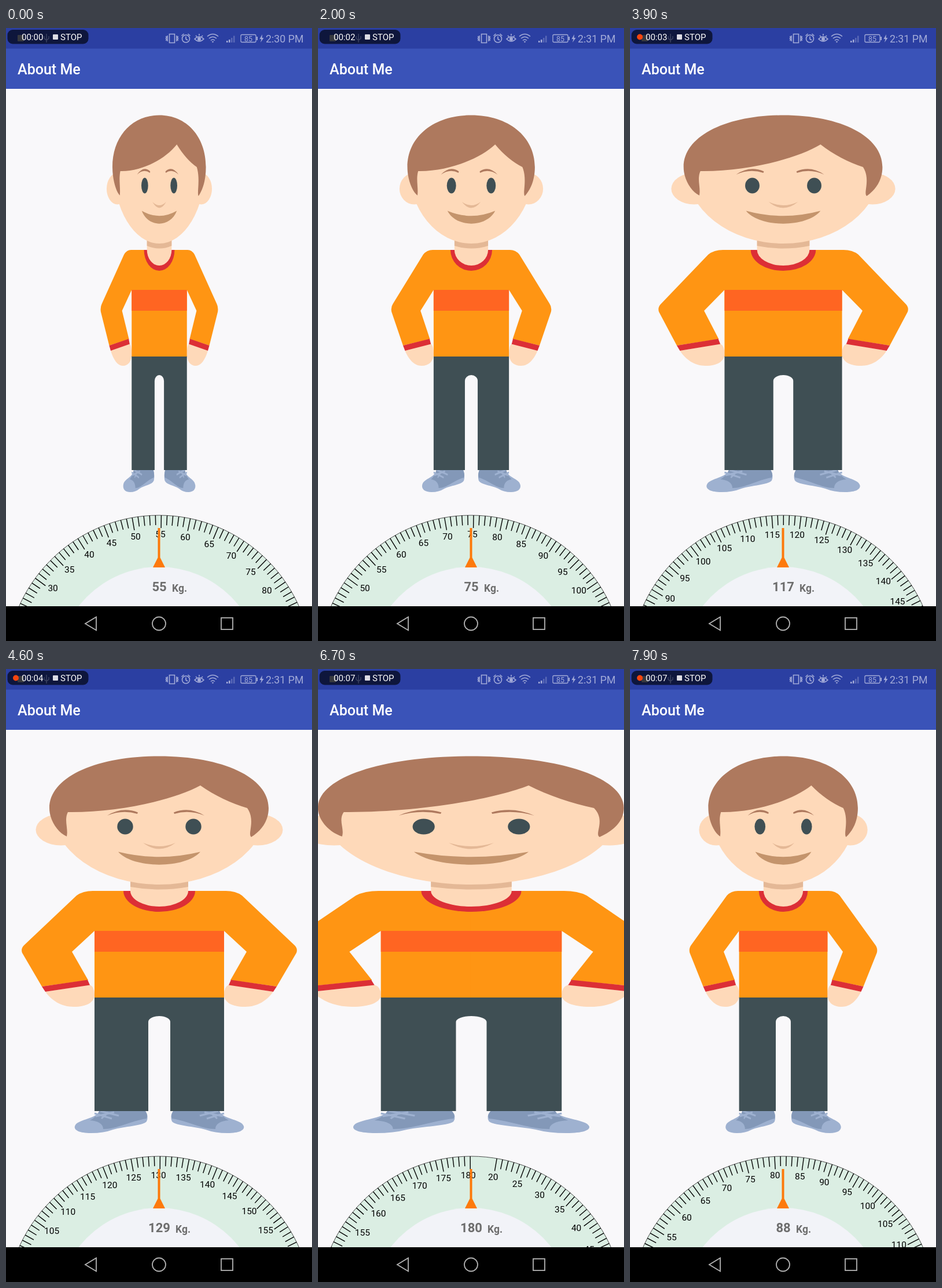
An HTML page that plays this animation: 529 px wide and 1058 px high, repeating every 8000 ms.

```html
<!DOCTYPE html>
<html lang="en">
<head>
<meta charset="utf-8">
<title>About Me</title>
<style>
  html, body { margin: 0; width: 100%; height: 100%; overflow: hidden; background: #f9f8fa; }
  svg { display: block; width: 100vw; height: 100vh; font-family: Roboto, sans-serif; }
  .skin { fill: #fed9b9; }
  .shade { fill: #e4b896; }
  .hair { fill: #ae795e; }
  .slate { fill: #3f4f54; }
  .red { fill: #dc2f36; }
  .orange { fill: #ff9513; }
  .icons { fill: none; stroke: #a3abd8; stroke-width: 1.6; }
  .solid { fill: #a3abd8; stroke: none; }
  .value { font-weight: 700; fill: #6d6d6d; }
  .labels { font-size: 15.5px; text-anchor: middle; fill: #000; }
</style>
</head>
<body>
<svg viewBox="0 0 529 1058" preserveAspectRatio="none">
  <defs>
    <g id="arm">
      <path class="skin" d="M-197 557C-186 572-170 583-148 583C-125 583-112 575-112 562Q-112 549-120 545Z"/>
      <path class="orange" d="M1 383H-115Q-132 383-143 391L-233 476Q-240 482-237 490L-203 548L-123 537L-151 488L-112 452V567H1Z"/>
      <path class="red" d="M-203 548L-124 536.500L-120 545.500L-197 557Z"/>
    </g>
    <g id="shoe">
      <path fill="#9eb1d0" d="M-102 763H-24Q-18 772-22 781C-30 789-60 789-80 795Q-96 801-118 801C-138 801-148 796-146 789C-142 777-115 779-102 763Z"/>
      <path fill="#8398b8" d="M-104 763H-24Q-19 770-22 776C-50 780-72 794-97 794C-97 785-106 780-120 779Q-108 773-104 763Z"/>
      <path fill="none" stroke="#9eb1d0" stroke-width="3" d="M-112 767L-82 776M-110 772L-78 765M-102 763L-70 771M-100 776L-88 765"/>
    </g>
    <path id="brow" class="hair" d="M-90 253Q-64 237-37 247.500L-38 250Q-64 242-90 253Z"/>
  </defs>

  <rect width="529" height="1058" fill="#f9f8fa"/>

  <g id="boy">
    <use href="#shoe"/><use href="#shoe" transform="scale(-1 1)"/>
    <path class="slate" d="M-112 566H112V763H19V609A19 10 0 0 0-19 609V763H-112Z"/>
    <use href="#arm"/><use href="#arm" transform="scale(-1 1)"/>
    <path fill="#ff6522" d="M-112 452H112V488H-112Z"/>
    <path class="red" d="M-62 383A62 36 0 0 0 62 383Z"/>
    <path class="skin" d="M-50 355H50V383A50 27 0 0 1-50 383Z"/>
    <path class="shade" d="M-50 360H50V376Q0 385-50 376Z"/>
    <ellipse class="skin" cx="-170" cy="277.500" rx="43.500" ry="27"/>
    <ellipse class="skin" cx="170" cy="277.500" rx="43.500" ry="27"/>
    <path class="skin" d="M-186 240L-150 190H150L186 240A186 132 0 0 1-186 240Z"/>
    <path class="hair" d="M-190 240C-190 187-110 150.500 0 150.500C110 150.500 189 187 189 240C189 261 178 278 159 290C152 285 167 261 152 240C125 232 95 218 71 201C25 226-70 248-158 247C-165 261-157 275-160 289C-176 282-190 261-190 240Z"/>
    <use href="#brow"/><use href="#brow" transform="translate(-12) scale(-1 1)"/>
    <ellipse class="slate" cx="-59" cy="272" rx="13.700" ry="13.500"/>
    <ellipse class="slate" cx="59" cy="272" rx="13.700" ry="13.500"/>
    <path class="shade" d="M-28 300Q0 312 28 300Q0 321-28 300Z"/>
    <path fill="#c4946c" d="M-71 315.500Q0 333 71 315.500C45 345-45 345-71 315.500Z"/>
  </g>

  <circle cx="264.500" cy="1106" r="265" fill="#dbeee3" stroke="#222" stroke-width=".8"/>
  <circle cx="264.500" cy="1106" r="176" fill="#f2f3f8"/>
  <path id="ticks" fill="none" stroke="#000" stroke-width="1.400"/>
  <g id="labels" class="labels"></g>
  <circle id="touch" r="14" fill="#fff" fill-opacity=".35" stroke="#b9c6c6" stroke-opacity=".7" stroke-width="1.500"/>
  <path fill="#fd7a0c" d="M262.500 863H266.500V914L275 931H254L262.500 914Z"/>
  <text id="number" class="value" x="265" y="972" font-size="22" text-anchor="middle"></text>
  <text id="unit" class="value" y="973" font-size="17.500">Kg.</text>

  <rect width="529" height="36" fill="#2b3fa2"/>
  <rect y="35.500" width="529" height="69.500" fill="#3a53b8"/>
  <text x="20" y="80" font-size="25" font-weight="500" fill="#fff">About Me</text>

  <rect x="2.500" y="3" width="140" height="24.500" rx="9" fill="#0e163c"/>
  <rect x="20" y="12" width="11" height="11" rx="1" fill="#37393f"/>
  <path d="M70 10V25M66 14V18L70 21L74 18V14" fill="none" stroke="#3a4160" stroke-width="1.500"/>
  <circle id="rec" cx="17" cy="15.500" r="5" fill="#f4450f"/>
  <g font-size="15" fill="#fff">
    <text id="timer" x="27" y="21"></text>
    <text x="94" y="21">STOP</text>
  </g>
  <rect x="81" y="11" width="9" height="9" rx="1" fill="#dcdce4"/>

  <g class="icons">
    <path d="M282.500 10.500H291.500V25.500H282.500ZM279 13V23M295 13V23M276.500 14L277.500 16L276.500 18L277.500 20L276.500 22M297.500 14L296.500 16L297.500 18L296.500 20L297.500 22"/>
    <circle cx="311" cy="18.500" r="6.500"/>
    <path d="M311 14.500V19L314 21M303.500 13.500L307.500 10M318.500 13.500L314.500 10"/>
    <path d="M326 19Q334 11 342 19Q334 27 326 19ZM328 13L330 15M334 10V13M340 13L338 15"/>
    <circle class="solid" cx="334" cy="19" r="3"/>
    <path d="M348 14.500Q357.500 6.500 367 14.500M351 18Q357.500 12.500 364 18M354 21.500Q357.500 18.500 361 21.500"/>
    <path class="solid" d="M355.500 23L357.500 25.500L359.500 23ZM381 22H383.500V25H381ZM385 20H387.500V25H385Z"/>
    <path class="solid" opacity=".4" d="M389 17H391.500V25H389ZM393 13.500H395.500V25H393Z"/>
    <rect x="406" y="11.500" width="26" height="13" rx="2" stroke-width="1.300"/>
    <path class="solid" d="M433 15H435V21H433ZM443 11L438.500 19H441.500L440 25L445.500 17H442.500Z"/>
  </g>
  <g class="solid">
    <text x="419" y="22.500" font-size="12.500" text-anchor="middle">85</text>
    <text id="clock" x="449" y="24.500" font-size="17.800"></text>
  </g>

  <rect y="998" width="529" height="60" fill="#000"/>
  <g fill="none" stroke="#b4b4b4" stroke-width="1.800">
    <path d="M137 1028L156 1016.500V1039.500Z"/>
    <circle cx="264.500" cy="1028" r="11.500"/>
    <rect x="372" y="1018" width="20" height="20"/>
  </g>
</svg>
<script>
const LOOP = 8000, STEP = 100;
const CX = 264.5, CY = 1106, RIM = 265, LABEL_R = 227;
const MIN = 20, MAX = 180;
// labels share the full circle evenly; ticks cover 350 degrees of it
const LABEL_UNIT = 2 * Math.PI / (MAX - MIN + 5);
const TICK_UNIT = 350 / 180 * Math.PI / (MAX - MIN);

// time, dial position, weight
const drags = [
  [0, 54.7, 55], [100, 54.7, 55], [300, 57, 57], [800, 57, 57],
  [1700, 71, 71], [2000, 74.7, 75], [2300, 74.7, 75],
  [3000, 97.4, 96], [3200, 101, 101], [3400, 101, 101],
  [4300, 130.1, 129], [4800, 130.1, 129], [5400, 169.9, 167],
  [5600, 174.5, 174], [5700, 174.5, 174], [6600, 180.55, 180],
  [6700, 180.55, 180], [7500, 115, 120], [7900, 81.6, 88], [8000, 81.6, 88]
];
// each entry starts a recorder second; its light comes on at the second time
const seconds = [
  [0, 300], [900, 1400], [1800, 2400], [3100, 3500],
  [4200, 4600], [4900, 5500], [6000, 6300], [6700, 7600]
];

const $ = id => document.getElementById(id);
const angle = v => (v - MIN) * LABEL_UNIT;
const polar = (a, r) => [CX + r * Math.sin(a), CY - r * Math.cos(a)];

let tickPath = '';
const labels = [];
for (let v = MIN; v <= MAX; v++) {
  const major = v % 5 === 0;
  const a = (v - MIN) * TICK_UNIT;
  tickPath += `M${polar(a, RIM)}L${polar(a, RIM - (major ? 22 : 17))}`;
  if (major) {
    const node = document.createElementNS('http://www.w3.org/2000/svg', 'text');
    node.textContent = v;
    $('labels').append(node);
    labels.push({ v, node });
  }
}
$('ticks').setAttribute('d', tickPath);

function dragAt(t) {
  const i = drags.findIndex(k => k[0] > t);
  const [a, b] = [drags[i - 1], drags[i]];
  const p = (t - a[0]) / (b[0] - a[0]);
  return [1, 2].map(n => a[n] + (b[n] - a[n]) * p);
}

function place(node, a, r, x = 'x', y = 'y') {
  const [px, py] = polar(a, r);
  node.setAttribute(x, px);
  node.setAttribute(y, py);
}

function render(t) {
  const [dial, weight] = dragAt(t);
  const kg = Math.round(weight);
  const turn = angle(dial);

  $('boy').setAttribute('transform', `translate(265) scale(${kg / 129} 1)`);
  $('ticks').setAttribute('transform', `rotate(${-turn * 180 / Math.PI} ${CX} ${CY})`);
  for (const { v, node } of labels) place(node, angle(v) - turn, LABEL_R);
  $('number').textContent = kg;
  $('unit').setAttribute('x', kg < 100 ? 287 : 293);

  place($('touch'), angle(75) - turn, 234, 'cx', 'cy');
  $('touch').style.display = t >= 2400 && t < 3200 ? '' : 'none';

  const s = seconds.findLastIndex(k => k[0] <= t);
  $('timer').textContent = '00:0' + s;
  $('rec').style.display = t >= seconds[s][1] ? '' : 'none';
  $('clock').textContent = t < 700 ? '2:30 PM' : '2:31 PM';
}

const start = performance.now();
function frame() {
  const t = (performance.now() - start) % LOOP;
  render(Math.floor(t / STEP) * STEP);
  requestAnimationFrame(frame);
}
frame();
</script>
</body>
</html>
```
